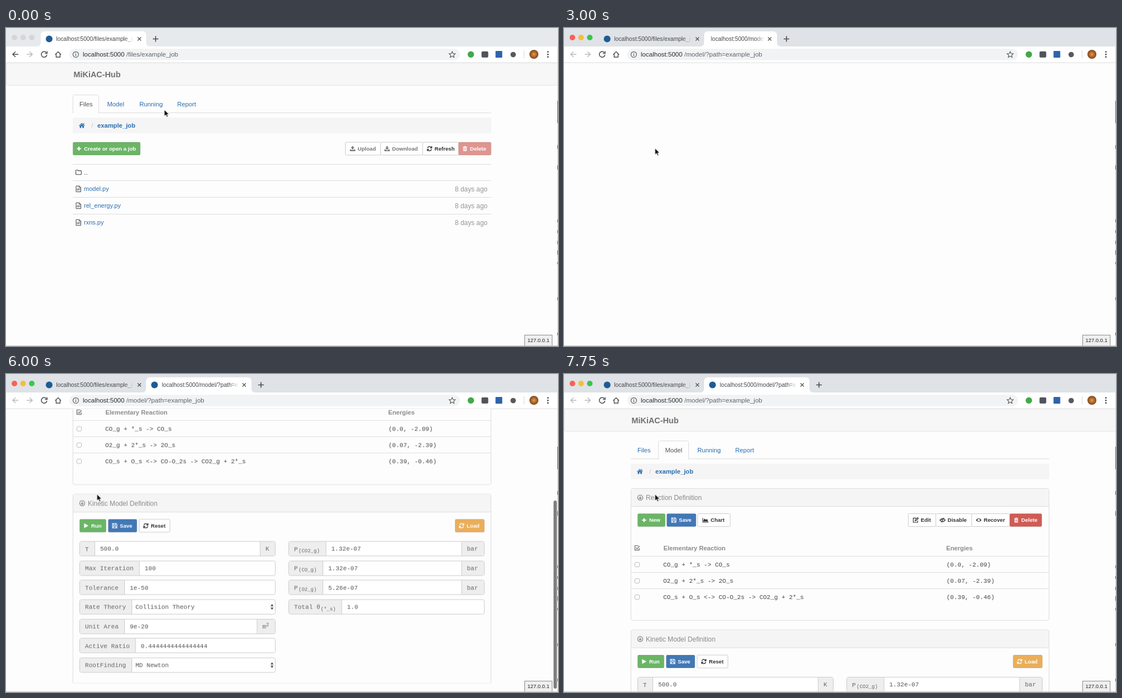
An HTML page that plays this animation: 985x568 px, repeating every 8 s.

```html
<!DOCTYPE html>
<html lang="en">
<head>
<meta charset="utf-8">
<title>Job manager</title>
<style>
html, body { margin: 0; width: 100%; height: 100%; overflow: hidden; background: #fdfdfd; }
svg { display: block; width: 985px; height: 568px; }
text { font-family: "Liberation Sans", Arial, sans-serif; white-space: pre; }
.mono { font-family: "Liberation Mono", "Courier New", monospace; }
.bold { font-weight: 700; }
</style>
</head>
<body>
<svg id="stage" viewBox="0 0 985 568" xmlns="http://www.w3.org/2000/svg"></svg>
<script>
const LOOP = 8000;
const LINK = '#2b6cb0', GREY = '#8a8a8a', INK = '#333', EDGE = '#ddd';
const GREEN = '#6bb566', BLUE = '#4278b6', RED = '#d05c54', ORANGE = '#eaae5b';

const rect = (x, y, w, h, fill, stroke = 'none', r = 0) =>
  `<rect x="${x}" y="${y}" width="${w}" height="${h}" rx="${r}" fill="${fill}" stroke="${stroke}"/>`;
const circle = (x, y, r, fill, extra = '') => `<circle cx="${x}" cy="${y}" r="${r}" fill="${fill}" ${extra}/>`;
const line = (x1, y1, x2, y2, color, w = 1) =>
  `<path d="M${x1} ${y1}L${x2} ${y2}" stroke="${color}" stroke-width="${w}" fill="none"/>`;
const path = (d, fill, stroke = 'none', w = 1) => `<path d="${d}" fill="${fill}" stroke="${stroke}" stroke-width="${w}"/>`;
// Text is placed by its left edge and vertical middle.
const text = (x, y, s, size = 11.2, fill = INK, cls = '') =>
  `<text x="${x}" y="${(y + size * 0.36).toFixed(2)}" font-size="${size}" fill="${fill}" class="${cls}">${s.replace(/</g, '&lt;')}</text>`;
const mono = (x, y, s, fill = '#484848', size = 11) => text(x, y, s, size, fill, 'mono');
const group = (id, body, extra = '') => `<g id="${id}" ${extra}>${body}</g>`;

// Icons are drawn around 0,0 in a box of about ten units: [d, stroke width or 0 for a fill].
const ICONS = {
  plus: ['M-3.6 0H3.6M0-3.6V3.6', 2.1],
  home: ['M-5.3.3L0-4.5 2.8-2V-4H4V-.9L5.3.3 4.6 1 0-3-4.6 1ZM-3.7 1L0-2.2 3.7 1V4.4H1V1.6H-1V4.4H-3.7Z', 0],
  upload: ['M0-4.7L3.4-1.2H1.2V1.5H-1.2V-1.2H-3.4ZM-4.8 1.4H-2.2V2.6H2.2V1.4H4.8V4.4H-4.8Z', 0],
  download: ['M0 2L3.4-1.5H1.2V-4.5H-1.2V-1.5H-3.4ZM-4.8 1.4H-2.5L0 3.4 2.5 1.4H4.8V4.4H-4.8Z', 0],
  refresh: ['M-3.5-.8A3.6 3.6 0 0 1 3-2.3M3.9-4.2V-1.3H1M3.5.8A3.6 3.6 0 0 1-3 2.3M-3.9 4.2V1.3H-1', 1.4],
  trash: ['M-3.8-3.4H-1.3L-.8-4.6H.8L1.3-3.4H3.8V-2.4H-3.8ZM-3.1-2H3.1V4.3H-3.1ZM-1.6-.9V3H-.9V-.9ZM-.3-.9V3H.4V-.9ZM1-.9V3H1.7V-.9Z', 0],
  folder: ['M-4.9 3V-3Q-4.9-4-4-4H-1.6L-.6-2.8H4Q4.9-2.8 4.9-2V3Q4.9 4 4 4H-4Q-4.9 4-4.9 3Z', 1.1],
  code: ['M-4.2-5.2H1.6L4.2-2.6V5.2H-4.2ZM1.4-5V-2.4H4M-1.3-.8L-2.6 1-1.3 2.8M1.3-.8L2.6 1 1.3 2.8M.4-.8L-.4 2.8', 1],
  down: ['M0-4.6A4.6 4.6 0 1 1-.01-4.6ZM0-2.6V2M-2.2-.1L0 2.2 2.2-.1', 1.3],
  save: ['M-4-4H2.4L4-2.4V4H-4ZM-2.2-4V-1.2H1.6V-4M-2.4 4V1H2.4V4', 1.1],
  chart: ['M-5.4-4H-4.4V3.2H5.4V4.2H-5.4ZM-3.8 2.6V0L-1.6-2.8.6-.4 2.8-2.2 4.8 2.6Z', 0],
  edit: ['M1-3.6H-4.2V4H3.6V1M-1 1.2L-.6-.6 3.4-4.4 4.7-3 .8.9Z', 1.2],
  eye: ['M-5 0Q0-6.4 5 0 0 6.4-5 0ZM0-2.3A2.3 2.3 0 1 0 .01-2.3Z', 0],
  slash: ['M-4.7 0Q0-5.6 4.7 0 0 5.6-4.7 0ZM-1.6 0A1.6 1.6 0 0 1 0-1.6M2.6-4.2L-2 4.2', 1.2],
  play: ['M-3.6-4.2L4.2 0-3.6 4.2Z', 0],
  check: ['M3.8.4V4H-4V-3.8H2.4M-2.2-.4L-.2 1.8 4.4-3.2', 1.3]
};
const icon = (name, x, y, color) => {
  const [d, w] = ICONS[name];
  return `<path transform="translate(${x} ${y})" d="${d}" fill-rule="evenodd" ${w ? `fill="none" stroke="${color}" stroke-width="${w}"` : `fill="${color}"`}/>`;
};

function button(x1, x2, y, iconName, textX, label, fill = '#fff', ink = fill === '#fff' ? INK : '#fff') {
  const edge = fill === '#fff' ? '#ccc' : 'rgba(0,0,0,.12)';
  return rect(x1 + .5, y - 11.5, x2 - x1 - 1, 23, fill, edge, 2) +
    icon(iconName, textX - 9, y, ink) + text(textX, y, label, 9.6, ink, 'bold');
}

// Browser chrome
const LIGHTS = [15, 30.5, 46];
const lights = colors => LIGHTS.map((x, i) => circle(x, 17, 5, colors[i])).join('');
const favicon = x => circle(x, 19.5, 6, '#1d5c93');
const cross = x => path(`M${x - 3} 16.5l6 6m0-6l-6 6`, 'none', '#555', 1.3);
const plusTab = x => path(`M${x - 5} 19.5h10m-5-5v10`, 'none', '#4a4d50', 1.6);
const activeTab = (x1, x2) =>
  path(`M${x1 - 7} 33Q${x1} 33 ${x1} 26V13Q${x1} 6 ${x1 + 7} 6H${x2 - 7}Q${x2} 6 ${x2} 13V26Q${x2} 33 ${x2 + 7} 33Z`, '#fff');
const tabTitle = (x, s, clip) =>
  `<g mask="url(#${clip})">${text(x, 19.5, s, 10.2, '#45494d')}</g>`;
const arrow = (x, dir, color) => path(`M${x - 5 * dir} 47H${x + 5 * dir}M${x} 42.3L${x + 5 * dir} 47 ${x} 51.7`, 'none', color, 1.5);
const url = rest => text(137, 47.3, `localhost:5000<tspan>`.slice(0, 14), 11.56, '#2a2d30') + text(214.8, 47.3, rest, 11.56, '#62666a');

const toolbar = rect(0, 33, 985, 29, '#fff') + rect(113, 37, 697, 20.5, '#f1f3f4', 'none', 10) +
  arrow(42, 1, '#b9bbbd') +
  path('M72 44A5 5 0 1 0 73 48M73.4 41.6V45.6H69.4', 'none', '#4a4d50', 1.5) +
  path('M87.8 47.4L93 42.4 98.2 47.4M89.5 46.5V52H96.5V46.5', 'none', '#4a4d50', 1.4) +
  circle(124.5, 47.3, 5, 'none', 'stroke="#5f6368" stroke-width="1.2"') + path('M124.5 46.5V50M124.5 44.3V45.5', 'none', '#5f6368', 1.3) +
  path('M796.2 42l1.6 3.6 3.9.4-2.9 2.6.8 3.8-3.4-2-3.4 2 .8-3.8-2.9-2.6 3.9-.4Z', 'none', '#505357', 1.1) +
  circle(829.5, 47.2, 5.7, '#43a84a') + rect(848.5, 41.8, 12, 11, '#50545a', 'none', 2) +
  rect(873.5, 41, 12, 12, '#2f63ab', 'none', 1) + circle(905, 47.5, 4.8, '#555a5f') +
  line(924.5, 40, 924.5, 54, '#d5d7d9') + circle(942, 47, 8, 'url(#avatar)') +
  [42.7, 47.2, 51.7].map(y => circle(967, y, 1.4, '#4a4d50')).join('');

const secondTab = (end, title, mask) => tabTitle(title ? 278 : 262, 'localhost:5000/model/?path=ex', mask) + cross(end - 13) + plusTab(end + 17);
const chrome = rect(0, 0, 985, 33, '#dfe2e6') + lights(['#f9605a', '#fabc3a', '#3bc651']) +
  group('dim', rect(0, 0, 985, 33, '#e7eaed') + lights(Array(3).fill('#d4d6d8'))) +
  group('tabsOld', activeTab(62, 250) + plusTab(267)) +
  group('tabsOpening', activeTab(250, 380) + secondTab(380, false, 'fade3')) +
  group('tabsNew', activeTab(250, 438) + secondTab(438, true, 'fade2')) +
  group('icon2', favicon(265)) +
  group('spinner', path('M265 14A5.5 5.5 0 1 1 259.5 19.5', 'none', '#3f7fd0', 1.7)) +
  favicon(77) + tabTitle(89.5, 'localhost:5000/files/example_job', 'fade1') + cross(238) + toolbar +
  group('urlOld', arrow(17, -1, '#4a4d50') + url('/files/example_job')) +
  group('urlNew', arrow(17, -1, '#b9bbbd') + url('/model/?path=example_job')) +
  line(0, 62, 985, 62, '#dcdcdc');

// Shared page top
const NAV = [['Files', 131, 119, 166], ['Model', 180.5, 168, 223], ['Running', 238], ['Report', 305.5]];
function header(active) {
  const [, , x1, x2] = NAV[active];
  return rect(.5, 62.5, 984, 40, '#f7f7f7', '#e4e4e4', 3) + text(120.5, 83.2, 'MiKiAC-Hub', 14.4, '#707070', 'bold') +
    line(119, 151.5, 866, 151.5, EDGE) +
    path(`M${x1 + .5} 152.5V122.5Q${x1 + .5} 119.5 ${x1 + 3.5} 119.5H${x2 - 3.5}Q${x2 - .5} 119.5 ${x2 - .5} 122.5V152.5`, '#fdfdfd', EDGE) +
    NAV.map(([s, x], i) => text(x, 135.5, s, 11.2, i === active ? '#555' : LINK)).join('') +
    rect(119, 160, 747, 28, '#f5f5f5', 'none', 3) + icon('home', 135.3, 174, LINK) +
    text(152.3, 174, '/', 11.2, '#c4c4c4') + text(163, 174, 'example_job', 11.2, LINK, 'bold');
}

// File list
const FILES = ['model.py', 'rel_energy.py', 'rxns.py'];
const createButton = fill => button(119, 240, 215.5, 'plus', 139.2, 'Create or open a job', fill);
const filesPage = header(0) + createButton(GREEN) + group('hover', createButton('#4c9a4b')) +
  button(605, 669, 215.5, 'upload', 627.5, 'Upload', '#fff', '#777') +
  button(668, 744, 215.5, 'download', 689, 'Download', '#fff', '#777') +
  button(743, 809, 215.5, 'refresh', 764.8, 'Refresh') +
  button(807, 866, 215.5, 'trash', 828, 'Delete', '#e0948f') +
  [243.5, 272.5, 302.5, 332.5].map(y => line(119, y, 866, y, EDGE)).join('') +
  icon('folder', 129.5, 257.7, '#444') + text(139.3, 258, '..', 11.2) +
  FILES.map((name, i) => {
    const y = 287.4 + i * 30;
    return icon('code', 129.3, y, '#444') + text(139, y, name, 11, LINK) + text(801, y + .5, '8 days ago', 11.9, '#969696');
  }).join('');

// Model page
const panel = (y, bottom, title) => rect(119.5, y + .5, 746, bottom - y - 1, '#fdfdfd', EDGE, 3) +
  path(`M120 ${y + 33}V${y + 4}Q120 ${y + 1} 123 ${y + 1}H862Q865 ${y + 1} 865 ${y + 4}V${y + 33}Z`, '#f5f5f5') +
  line(120, y + 32.5, 865, y + 32.5, EDGE) +
  icon('down', 136, y + 16.8, GREY) + text(146, y + 16.8, title, 11.9, GREY);

const REACTIONS = [
  ['CO_g + *_s -> CO_s', '(0.0, -2.09)'],
  ['O2_g + 2*_s -> 2O_s', '(0.07, -2.39)'],
  ['CO_s + O_s <-> CO-O_2s -> CO2_g + 2*_s', '(0.39, -0.46)']
];
const reactionPanel = panel(204, 440.5, 'Reaction Definition') +
  button(131, 181, 261, 'plus', 152, 'New', GREEN) + button(183, 236, 261, 'save', 205, 'Save', BLUE) +
  button(238, 297, 261, 'chart', 261.5, 'Chart') +
  button(614, 664, 261, 'edit', 636.5, 'Edit') + button(663, 728, 261, 'slash', 684.5, 'Disable') +
  button(727, 796, 261, 'eye', 749, 'Recover') + button(795, 853, 261, 'trash', 816, 'Delete', RED) +
  icon('check', 130.5, 310.5, '#777') +
  text(177.5, 311, 'Elementary Reaction', 11.2, GREY, 'bold') + text(682, 311, 'Energies', 11.2, GREY, 'bold') +
  REACTIONS.map(([formula, energy], i) => {
    const y = 340 + i * 29.1, top = Math.round(y - 15) + .5;
    return line(120, top, 865, top, EDGE) + rect(126.5, Math.round(y) - 3.5, 8, 8, '#fff', '#b9b9b9', 2) +
      mono(177, y, formula) + mono(682.5, y, energy);
  }).join('');

// A row of the form: label box, value, and an optional unit box or select arrows.
function field(x1, x2, row, label, split, value, { unit = '', unitX = x2, sub = '', subX = 0, select = false } = {}) {
  const y = 554.5 + row * 34.65, top = Math.round(y - 13.5) + .5;
  let s = rect(x1 + .5, top, x2 - x1 - 1, 26, '#fff', '#ccc', 3) +
    rect(x1 + 1, top + .5, split - x1 - 1, 25, '#eee', 'none', 2) + line(split, top, split, top + 26, '#ccc') +
    mono(x1 + 10, y, label, '#666', 11.1) + mono(split + (select ? 6.5 : 9.5), y, value, '#555');
  if (sub) s += mono(subX, y + 3, sub, '#666', 9);
  if (unit) s += rect(unitX, top + .5, x2 - unitX - 1, 25, '#eee', 'none', 2) + line(unitX, top, unitX, top + 26, '#ccc') +
    mono(unitX + 9.5, y, unit, '#666');
  if (unit === 'm') s += mono(unitX + 16, y - 3.5, '2', '#666', 9);
  if (select) s += path(`M${x2 - 9} ${y - 1.2}h5.4l-2.7-3.8ZM${x2 - 9} ${y + 1.2}h5.4l-2.7 3.8Z`, '#444');
  return s;
}
const left = (...args) => field(131, 481, ...args);
const right = (...args) => field(504, 854, ...args);
const bar = (sub, subX = 522) => ({ unit: 'bar', unitX: 813, sub, subX });
const modelPanel = panel(456.5, 796, 'Kinetic Model Definition') +
  button(131, 179, 513.5, 'play', 152, 'Run', GREEN) + button(182, 234, 513.5, 'save', 203, 'Save', BLUE) +
  button(237, 293, 513.5, 'refresh', 258.5, 'Reset') + button(801, 854, 513.5, 'refresh', 822, 'Load', ORANGE) +
  left(0, 'T', 158.5, '500.0', { unit: 'K', unitX: 453.5 }) +
  left(1, 'Max Iteration', 238, '100') +
  left(2, 'Tolerance', 211.5, '1e-50') +
  left(3, 'Rate Theory', 224.5, 'Collision Theory', { select: true }) +
  left(4, 'Unit Area', 211.5, '9e-20', { unit: 'm', unitX: 448 }) +
  left(5, 'Active Ratio', 231, '0.4444444444444444') +
  left(6, 'RootFinding', 224.5, 'MD Newton', { select: true }) +
  right(0, 'P', 571, '1.32e-07', bar('(CO2_g)')) +
  right(1, 'P', 565.5, '1.32e-07', bar('(CO_g)')) +
  right(2, 'P', 565.5, '5.26e-07', bar('(O2_g)')) +
  right(3, 'Total θ', 599, '1.0', { sub: '(*_s)', subX: 561.5 });

const fade = (id, x1, x2) => `<linearGradient id="g${id}" gradientUnits="userSpaceOnUse" x1="${x1}" x2="${x2}" y1="0" y2="0">
  <stop stop-color="#fff"/><stop offset="1" stop-color="#000"/></linearGradient>
  <mask id="${id}" maskUnits="userSpaceOnUse" x="0" y="0" width="${x2}" height="33">${rect(0, 0, x2, 33, `url(#g${id})`)}</mask>`;
const defs = `<defs>${fade('fade1', 212, 227)}${fade('fade2', 399, 415)}${fade('fade3', 342, 358)}
  <radialGradient id="avatar"><stop stop-color="#e0a545"/><stop offset=".55" stop-color="#b3652b"/><stop offset="1" stop-color="#7c4a20"/></radialGradient>
  <clipPath id="view"><rect y="62" width="985" height="505"/></clipPath></defs>`;

const edgeMarks = [[130, 40], [209, 7], [245, 8], [342, 5], [361, 5], [380, 6], [397, 8], [418, 4], [481, 5], [544, 5]]
  .map(([y, h]) => rect(984, y, 1, h, '#4d5668')).join('');
const cursor = group('arrow', path('M0 0V11.6L2.7 9.1 4.6 13.2 6.6 12.3 4.8 8.3H8.4Z', '#111', '#fff', .8));
const hand = group('hand', path('M-1.3 8V.6Q-1.2-.8 0-.8T1.3.6V5Q2.6 4.3 3.7 5.4 5 4.8 6 6 7.8 5.6 8 7.4V10.5L6.6 15H-1.2Q-3-11 -5 8.4'.replace('Q-3-11 -5 8.4', 'Q-2.6 11.5-4.8 8.8-4.8 6.6-1.3 8Z'), '#fff', '#111', 1));

document.getElementById('stage').innerHTML = defs + rect(0, 0, 985, 568, '#fdfdfd') + chrome +
  `<g clip-path="url(#view)">${group('files', filesPage)}${group('model', group('scroll', header(1) + reactionPanel + modelPanel))}` +
  group('status', rect(925.5, 548.5, 49, 19, '#efefef', '#8c8c8c') + text(930.5, 558, '127.0.0.1', 9.4, '#222')) +
  group('thumb', rect(977, 64, 6, 336, '#808080', 'none', 3)) + '</g>' +
  line(984.5, 33, 984.5, 568, '#d4d4d4') + edgeMarks + line(0, 567.5, 985, 567.5, '#c9c9c9') + cursor + hand;

// Stepped CSS animation from [time in ms, declarations] pairs.
const sheet = [];
function steps(id, list) {
  const frames = list.map(([t, css]) => `${t / LOOP * 100}%{${css}}`).join('');
  sheet.push(`@keyframes ${id}{${frames}100%{${list[list.length - 1][1]}}}#${id}{animation:${id} ${LOOP}ms step-end infinite}`);
}
const opacity = (id, ...list) => steps(id, list.map(([t, v]) => [t, `opacity:${v}`]));
const during = (id, from, to = LOOP) => {
  const list = from ? [[0, 0], [from, 1]] : [[0, 1]];
  opacity(id, ...list, ...(to < LOOP ? [[to, 0]] : []));
};
const move = (x, y) => `transform:translate(${x}px,${y}px)`;

during('dim', 0, 1750);
during('hover', 2500, 3000);
for (const id of ['files', 'tabsOld', 'urlOld']) during(id, 0, 3000);
during('urlNew', 3000);
during('tabsOpening', 3000, 3250);
during('tabsNew', 3250);
during('model', 3250);
during('spinner', 3250, 3500);
during('icon2', 3500);

const SCROLL = [[0, 0], [5750, 64.5], [6000, 242.5], [6250, 243.5], [6500, 244], [6750, 130], [7000, -3], [7500, 0]];
steps('scroll', SCROLL.map(([t, y]) => [t, move(0, -y)]));
steps('thumb', SCROLL.map(([t, y]) => {
  const alpha = t < 5750 ? 0 : t < 7500 ? 1 : .5;
  return [t, `opacity:${alpha};${move(0, Math.round(Math.max(0, y) * .667))}`];
}).concat([[7750, `opacity:0;${move(0, 0)}`]]));
steps('status', [[0, move(0, 0)], [7000, move(0, 3)], [7500, move(0, 0)]]);

const POINTER = [[0, 282.5, 146], [1000, 180, 207], [1250, 167, 214], [1500, 166.5, 215], [2500, 161, 221], [2750, 162, 214], [3000, 162.3, 214.7]];
const onButton = t => t >= 2500 && t < 3000;
for (const [id, shown] of [['arrow', t => !onButton(t)], ['hand', onButton]])
  steps(id, POINTER.map(([t, x, y]) => [t, `opacity:${+shown(t)};${move(x, y)}`]));

const style = document.createElement('style');
style.textContent = sheet.join('\n');
document.head.append(style);
</script>
</body>
</html>
```
